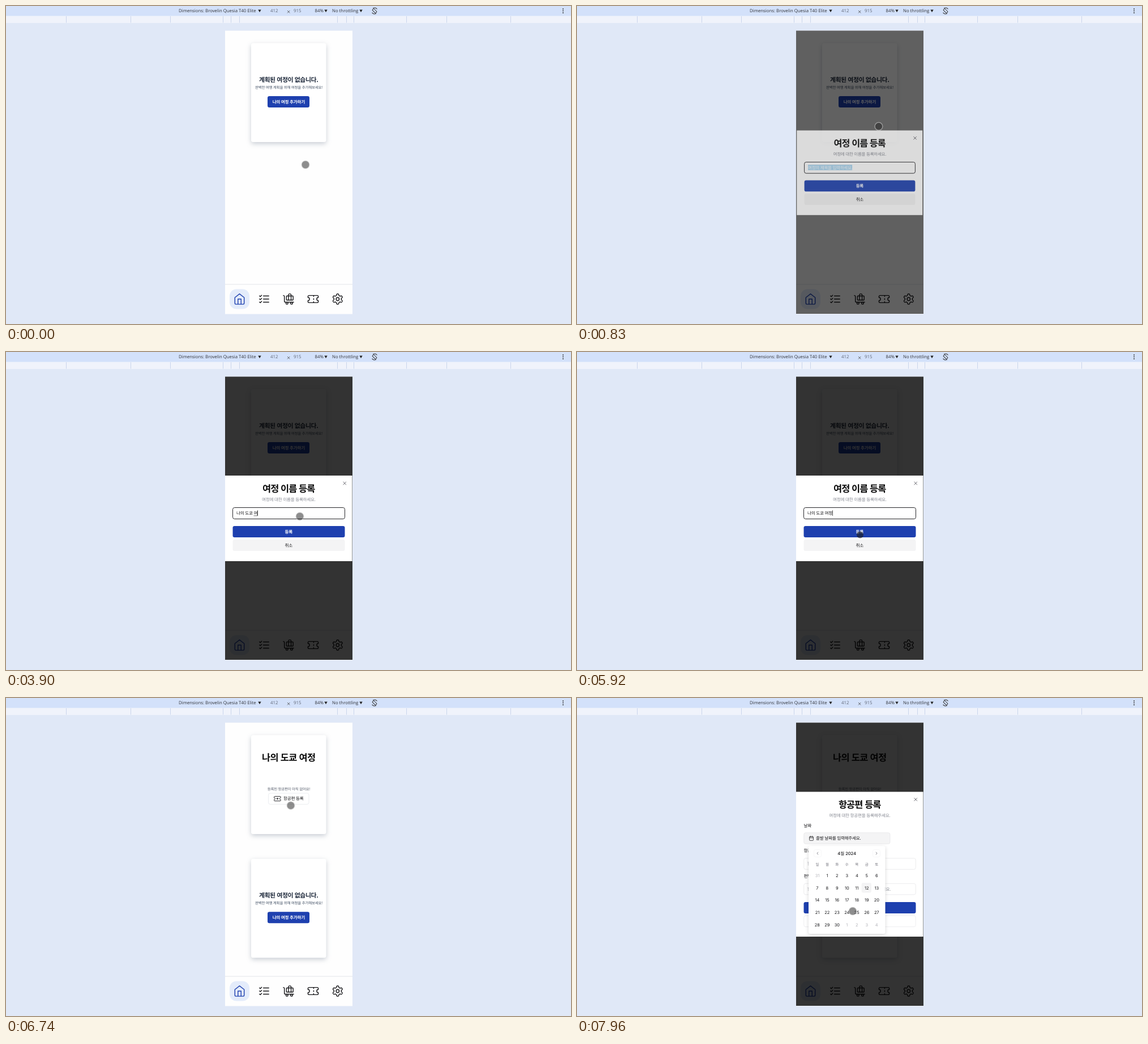
An HTML page for the animation above (8000 ms loop, 998x561 px).

```html
<!DOCTYPE html>
<html lang="ko">
<head>
<meta charset="utf-8">
<title>Trip planner demo</title>
<style>
html, body { margin: 0; width: 100%; height: 100%; overflow: hidden; background: #e0e8f7; }
svg { display: block; width: 998px; height: 561px; }
text {
  font-family: "Noto Sans CJK KR", "Noto Sans CJK", "Noto Sans KR", sans-serif;
  letter-spacing: -.04em; white-space: pre; text-rendering: geometricPrecision;
}
.bar text { font-family: "Open Sans", "Noto Sans", sans-serif; letter-spacing: 0; }
.cal text { font-family: Inter, "Noto Sans CJK KR", sans-serif; letter-spacing: -.01em; }
.icon { fill: none; stroke: #18181b; stroke-width: 1.55; stroke-linecap: round; stroke-linejoin: round; }
.soft { filter: drop-shadow(0 3px 4px rgba(55, 75, 100, .27)); }
.pop { filter: drop-shadow(0 2px 3px rgba(0, 0, 0, .16)); }
</style>
</head>
<body>
<svg id="stage" viewBox="0 0 998 561" xmlns="http://www.w3.org/2000/svg"></svg>
<script>
const LOOP = 8000;
const BLUE = '#1e40af', INK = '#18181b', MUTED = '#888b94';
const S = 7.645, XS = 6.55, LG = 10.92, XL = 16.4;

// ---- drawing helpers ----
const rect = (x, y, w, h, fill, r = 0, more = '') =>
  `<rect x="${x}" y="${y}" width="${w}" height="${h}" rx="${r}" fill="${fill}" ${more}/>`;
const frame = (x, y, w, h, stroke, fill = '#fff', r = 3.2, sw = .7) =>
  rect(x, y, w, h, fill, r, `stroke="${stroke}" stroke-width="${sw}"`);
// y is the middle of the glyphs
const text = (x, y, str, size, fill, more = '') =>
  `<text x="${x}" y="${(y + size * .38).toFixed(2)}" font-size="${size}" fill="${fill}" ${more}>${str}</text>`;
const MID = 'text-anchor="middle"', BOLD = 'font-weight="700"';
const mid = (x, y, str, size, fill, more = '') => text(x, y, str, size, fill, `${MID} ${more}`);
const icon = (x, y, k, body, more = '') =>
  `<g class="icon" transform="translate(${x} ${y}) scale(${k}) translate(-12 -12)" ${more}>${body}</g>`;
const path = d => `<path d="${d}"/>`;
const cross = (x, y) =>
  `<path d="M${x - 2.4} ${y - 2.4}l4.8 4.8m0 -4.8l-4.8 4.8" stroke="#52525b" stroke-width=".9" stroke-linecap="round"/>`;

// ---- icons on a 24 unit grid ----
const TICKET = 'M2 9a3 3 0 0 1 0 6v2a2 2 0 0 0 2 2h16a2 2 0 0 0 2-2v-2a3 3 0 0 1 0-6V7a2 2 0 0 0-2-2H4a2 2 0 0 0-2 2Z';
const HOME = path('M3 9l9-7 9 7v11a2 2 0 0 1-2 2H5a2 2 0 0 1-2-2zM9 22V12h6v10');
const LIST = path([6, 12, 18].map(y => `M3 ${y - .3}l1.5 1.5 2.7-2.7M10.5 ${y}H21`).join(''));
const BAG = path('M22 18H6a2 2 0 0 1-2-2V7a2 2 0 0 0-2-2M17 14V4a2 2 0 0 0-2-2h-1a2 2 0 0 0-2 2v10') +
  '<rect x="8" y="6" width="13" height="8" rx="1"/><circle cx="18" cy="20" r="2"/><circle cx="9" cy="20" r="2"/>';
const gearPoint = i => {
  const a = i * Math.PI / 60, r = 8.5 + 1.5 * Math.tanh(2 * Math.cos(6 * a));
  return `${(12 + r * Math.sin(a)).toFixed(2)} ${(12 - r * Math.cos(a)).toFixed(2)}`;
};
const GEAR = path(`M${Array.from({ length: 120 }, (_, i) => gearPoint(i)).join('L')}Z`) +
  '<circle cx="12" cy="12" r="3"/>';
const DATE = path('M8 2v4M16 2v4M3 10h18M5 4h14a2 2 0 0 1 2 2v14a2 2 0 0 1-2 2H5a2 2 0 0 1-2-2V6a2 2 0 0 1 2-2z');

// ---- browser toolbar ----
function toolbar() {
  const label = (x, str, fill = '#303238') => `<text x="${x}" y="11.4" font-size="7.8" fill="${fill}">${str}</text>`;
  const arrow = x => `<path d="M${x - 2.7} 6.5h5.4l-2.7 4.6z" fill="#222"/>`;
  const ticks = [106, 220, 290, 383, 397, 412, 585, 601, 614, 707, 778, 891];
  return `<g class="bar">${rect(0, 0, 998, 17.6, '#d3e1fa')}${rect(0, 17.6, 998, 12.4, '#f0f3fb')}
    ${ticks.map(x => rect(x, 18, 1, 11.5, '#c9d5ec')).join('')}
    ${label(305, 'Dimensions: Brovelin Quesia T40 Elite')}${arrow(448)}
    ${label(467, '412', '#5f6675')}${label(508, '915', '#5f6675')}
    <path d="M497 8l4.4 4.4m0 -4.4l-4.4 4.4" stroke="#444" stroke-width=".8"/>
    ${label(545.5, '84%')}${arrow(565)}${label(576, 'No throttling')}${arrow(627)}
    <g fill="none" stroke="#333" stroke-width="1" transform="translate(651 8.6) rotate(45)">
      <rect x="-1.9" y="-4" width="3.8" height="8" rx=".8" transform="rotate(-90)"/>
      <path d="M-5.3 -1.2A5.4 5.4 0 0 1 1 -5.3M5.3 1.2A5.4 5.4 0 0 1 -1 5.3"/>
    </g>
    ${[5.3, 8.6, 11.9].map(y => `<circle cx="984" cy="${y}" r="1" fill="#333"/>`).join('')}</g>`;
}

// ---- app screen ----
const card = y => rect(433, y, 132.5, 174.5, '#fff', 3.5, 'class="soft"');
const emptyCard = y => card(y) +
  mid(499.1, y + 64, '계획된 여정이 없습니다.', LG, '#1e293b', BOLD) +
  mid(499.5, y + 78, '완벽한 여행 계획을 위해 여정을 추가해보세요!', XS, '#475569') +
  rect(462, y + 93.5, 74, 20, BLUE, 3.3) +
  mid(499.3, y + 103.3, '나의 여정 추가하기', S, '#fff', BOLD);
const tripCard = () => card(65.5) +
  mid(499.2, 105.2, '나의 도쿄 여정', XL, '#0a0a0a', BOLD) +
  mid(499.5, 161, '등록된 항공편이 아직 없어요!', XS, '#5b6270') +
  frame(463.5, 168, 71.5, 19.5, '#e2e5ea') +
  icon(479.4, 177.6, .58, path(TICKET + 'M9 12h6M12 9.2v5.6'), 'stroke-width="2"') +
  text(490, 177.5, '항공편 등록', S, INK);
const navBar = () => rect(387, 490.6, 225, .9, '#dfe2e7') +
  rect(395, 499.5, 35, 35, '#e4ecfb', 12) +
  icon(412.5, 517, .91, HOME, `style="stroke:${BLUE}"`) +
  icon(456, 517, .91, LIST) + icon(499, 517, .91, BAG) +
  icon(542.5, 517, .91, path(TICKET + 'M13 5v2M13 17v2M13 11v2')) + icon(585.8, 517, .91, GEAR);

// ---- dialogs ----
const heading = (y, title, note) =>
  mid(499.2, y, title, XL, '#0a0a0a', `${BOLD} style="letter-spacing:-.055em"`) +
  mid(499.3, y + 19, note, S, MUTED) + cross(598.2, y - 9.2);

const nameDialog = () => rect(387, 218, 224.5, 151, '#fff') +
  heading(240.8, '여정 이름 등록', '여정에 대한 이름을 등록하세요.') +
  frame(400.5, 274.5, 198, 20, '#27272a', '#fff', 3.2, 1) +
  rect(407, 279.3, 79, 9.6, '#a9d5f0', 0, 'id="mark"') +
  text(407, 284.2, '', S, INK, 'id="typed"') +
  rect(0, 288.6, 7, .6, INK, 0, 'id="under"') + rect(0, 279.3, .7, 9.7, '#000', 0, 'id="caret"') +
  rect(400.5, 307, 198, 20, BLUE, 3.2) + mid(499.3, 317, '등록', S, '#fff', BOLD) +
  rect(400.5, 331, 198, 20, '#f4f4f5', 3.2) + mid(499.3, 341, '취소', S, INK);

const flightDialog = () => rect(387, 165.5, 224.5, 255.5, '#fff') +
  heading(188.2, '항공편 등록', '여정에 대한 항공편을 등록해주세요.') +
  text(400.5, 225, '날짜', S, INK) +
  `<g id="dateBox">${frame(400.7, 237.7, 152.3, 19.6, '#e4e4e7', 'inherit')}</g>` +
  icon(414, 247.5, .38, DATE, 'style="stroke-width:2"') +
  text(422, 247.4, '출발 날짜를 입력해주세요.', S, INK, 'id="dateText"') +
  text(400.5, 269.5, '항공사', S, INK) + frame(400.7, 282.7, 197.6, 19.6, '#e4e4e7') +
  text(407, 292.5, '항공사를 입력해주세요.', S, MUTED) +
  text(400.5, 314.3, '편명', S, INK) + frame(400.7, 327.3, 197.6, 19.6, '#e4e4e7') +
  text(407, 337, '항공권에 적힌 편명을 모두 함께 꼭 입력해주세요.', S, MUTED) +
  rect(400.5, 360, 198, 20, BLUE, 3.2) + mid(499.3, 370, '등록', S, '#fff', BOLD) +
  frame(400.7, 384, 197.6, 19.6, '#e8e8eb') + mid(499.3, 394, '취소', S, INK);

function calendar() {
  const col = i => 424.4 + 17.47 * (i % 7), row = i => 313 + 21.75 * Math.floor(i / 7);
  const days = Array.from({ length: 35 }, (_, i) => {
    const out = i < 1 || i > 30, n = i < 1 ? 31 : i > 30 ? i - 30 : i;
    return mid(col(i), row(i), n, 7.5, out ? '#b4b4ba' : INK);
  });
  const nav = (x, d) => frame(x - 6.5, 267.5, 13, 13, '#f1f1f3', '#fff', 3, .6) +
    `<path d="M${x - d} 271.7l${2 * d} 2.4l${-2 * d} 2.4" fill="none" stroke="#71717a" stroke-width=".8"/>`;
  return `<g class="cal">${rect(409, 261, 135.5, 155, '#fff', 3.5, 'class="pop"')}
    ${nav(425, -1)}${nav(529, 1)}${mid(476.7, 274, '4월 2024', S, INK, 'font-weight="500"')}
    ${[...'일월화수목금토'].map((d, i) => mid(col(i), 293.7, d, XS, '#71717a')).join('')}
    ${rect(502.6, 326, 17.4, 17.4, '#f4f4f5', 3.2)}${days.join('')}</g>`;
}

document.getElementById('stage').innerHTML = `
  ${rect(0, 0, 998, 561, '#e0e8f7')}${toolbar()}
  ${rect(387, 43.5, 225, 500, '#fefefe')}
  <g id="before">${emptyCard(65.5)}</g>
  <g id="after">${tripCard()}${emptyCard(283.7)}</g>
  ${navBar()}
  ${rect(387, 43.5, 225, 499.5, '#000', 0, 'id="shade"')}
  <g id="nameDlg">${nameDialog()}</g>
  <g id="flightDlg">${flightDialog()}</g>
  <g id="cal">${calendar()}</g>
  <g id="touch"><circle r="6.9" fill="#282828" fill-opacity=".53"/>
    <circle r="6.9" fill="none" stroke="#d4d4d4" stroke-opacity=".6" stroke-width="1.3"/></g>
  <circle id="press" r="6" fill="#1c1c1c" fill-opacity=".62"/>`;

const el = {};
document.querySelectorAll('[id]').forEach(e => el[e.id] = e);
const show = (e, on) => e.style.display = on ? '' : 'none';

// ---- timing ----
const clamp = v => Math.min(1, Math.max(0, v));
function ease(x) { // cubic-bezier(.25, .1, .25, 1)
  let a = 0, b = 1;
  for (let i = 0; i < 18; i++) {
    const u = (a + b) / 2, v = 1 - u;
    if (.75 * u * v * v + .75 * u * u * v + u ** 3 < x) a = u; else b = u;
  }
  const v = 1 - a;
  return .3 * a * v * v + 3 * a * a * v + a ** 3;
}
const fade = (t, open, close, ms = 200) => ease(clamp((t - open) / ms)) * (1 - ease(clamp((t - close) / ms)));

function popup(e, p, cx, cy, drop) {
  const k = .95 + .05 * p;
  show(e, p > .002);
  e.setAttribute('opacity', p);
  e.setAttribute('transform', `translate(${cx} ${cy + (1 - p) * drop}) scale(${k}) translate(${-cx} ${-cy})`);
}

// time, x, y, pace of the move that ends there
const MOVES = [
  [130, 529, 280], [570, 529, 173, 'both'], [715, 529, 173], [830, 533, 212, 'in'],
  [1460, 519, 290, 'out'], [5090, 519, 290], [5780, 500, 322.5, 'both'], [6440, 500, 322.5],
  [6740, 503, 190, 'both'], [6830, 503, 181, 'out'], [6930, 503, 181], [7210, 494, 252, 'both'],
  [7480, 492, 254, 'both'], [7960, 487, 376, 'both']
];
const PACE = { in: u => u * u, out: u => 1 - (1 - u) ** 3, both: u => u * u * (3 - 2 * u) };
function touchAt(t) {
  const i = MOVES.findIndex(m => m[0] > t);
  if (i <= 0) return (i ? MOVES[MOVES.length - 1] : MOVES[0]).slice(1, 3);
  const [t0, x0, y0] = MOVES[i - 1], [t1, x1, y1, pace] = MOVES[i];
  const u = (PACE[pace] || PACE.both)((t - t0) / (t1 - t0));
  return [x0 + (x1 - x0) * u, y0 + (y1 - y0) * u];
}
const PRESSES = [[620, 700], [5840, 5985], [6850, 6925], [7390, 7465]];

const TYPING = [
  [0, '여정의 제목을 입력하세요.'], [2460, 'ㄴ'], [2530, '나'], [2660, '낭'], [3060, '나으'],
  [3130, '나의'], [3200, '나의 '], [3270, '나의 도'], [3340, '나의 돜'], [3550, '나의 도쿄'],
  [3690, '나의 도쿄 '], [3830, '나의 도쿄 ㅇ'], [3900, '나의 도쿄 여'], [4180, '나의 도쿄 옂'],
  [4250, '나의 도쿄 여저'], [4320, '나의 도쿄 여정']
];
function typeField(t) {
  const str = TYPING.filter(s => s[0] <= t).pop()[1], marked = t < 2460;
  if (el.typed.textContent !== str) el.typed.textContent = str;
  el.typed.setAttribute('fill', marked ? '#f6fbff' : INK);
  show(el.mark, marked);
  show(el.caret, !marked && !(t >= 4880 && t < 5390));
  show(el.under, !marked && !str.endsWith(' ') && t < 5850);
  if (marked) return;
  const end = 407 + el.typed.getComputedTextLength();
  el.caret.setAttribute('x', end);
  el.under.setAttribute('x', end - 6.8);
}

function draw(t) {
  const name = fade(t, 736, 5975), flight = fade(t, 6960, 9e9), cal = fade(t, 7470, 9e9, 150);
  show(el.before, t < 6060);
  show(el.after, t >= 6060);
  el.shade.setAttribute('opacity', .8 * Math.max(name, flight));
  popup(el.nameDlg, name, 499.25, 293.5, 3);
  popup(el.flightDlg, flight, 499.25, 293.25, 5);
  popup(el.cal, cal, 476.7, 261, -4);
  if (name > .002) typeField(t);

  const picked = t >= 7400;
  el.dateBox.setAttribute('fill', picked ? '#f4f4f5' : '#fff');
  el.dateText.setAttribute('fill', picked ? INK : MUTED);

  const at = `translate(${touchAt(t).join(' ')})`, down = PRESSES.some(([a, b]) => t >= a && t < b);
  show(el.touch, !down);
  show(el.press, down);
  el.touch.setAttribute('transform', at);
  el.press.setAttribute('transform', at);
}

const start = performance.now();
function tick() {
  draw((performance.now() - start) % LOOP);
  requestAnimationFrame(tick);
}
tick();
</script>
</body>
</html>
```
